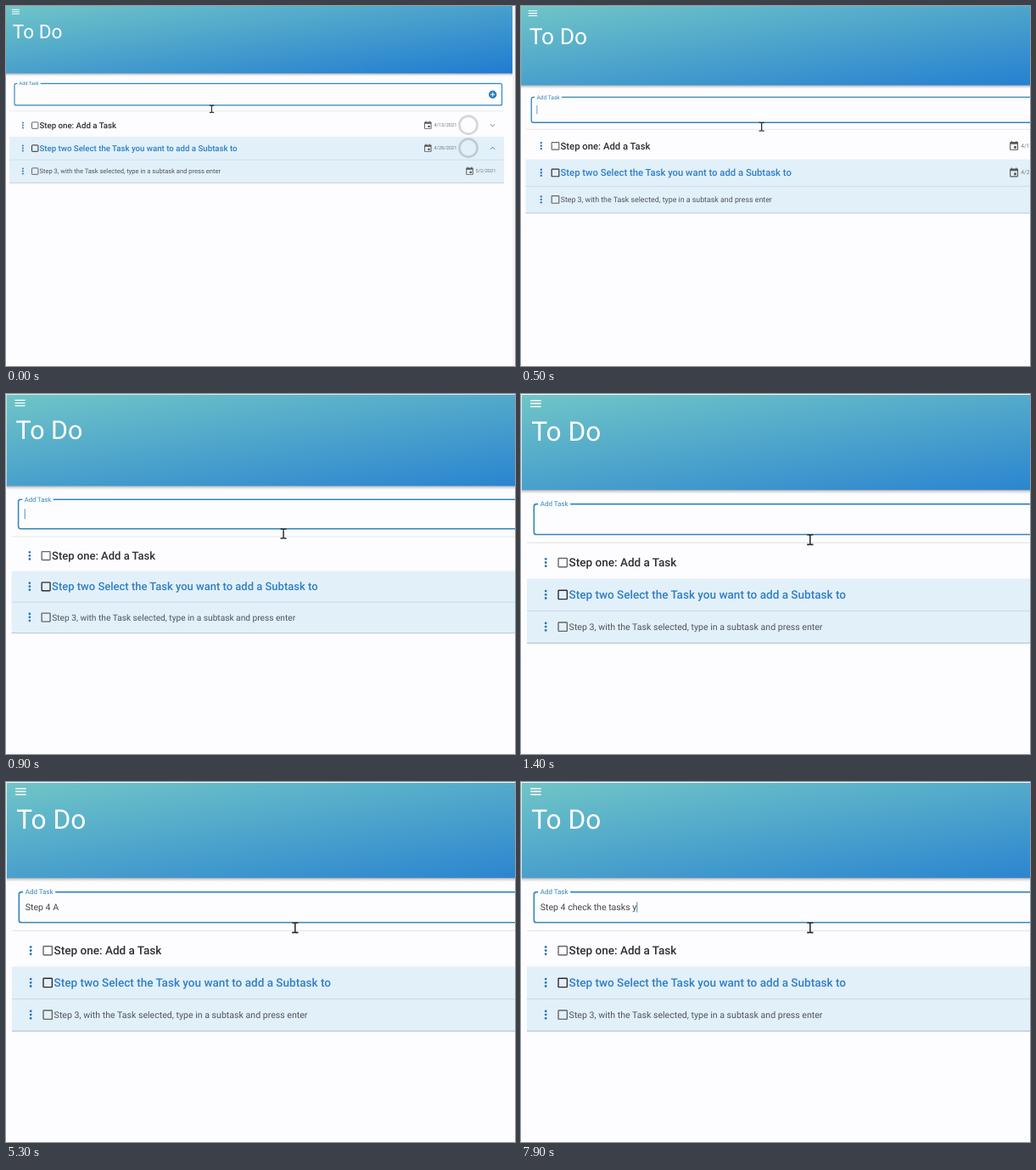
An HTML page for the animation above (8000 ms loop, 600x424 px).

```html
<!DOCTYPE html>
<html lang="en">
<head>
<meta charset="utf-8">
<title>To Do</title>
<style>
  html, body { margin: 0; width: 100%; height: 100%; overflow: hidden; background: #fdfcfe; }
  svg { display: block; width: 100vw; height: 100vh; }
  text { font-family: Roboto, sans-serif; text-rendering: geometricPrecision; white-space: pre; }
  .line { fill: none; stroke-width: 1; }
</style>
</head>
<body>
<svg viewBox="0 0 600 424" preserveAspectRatio="xMinYMin meet">
  <defs>
    <linearGradient id="sky" x1="0" y1="0" x2="1" y2="1">
      <stop offset="0" stop-color="#70c5c7"/>
      <stop offset="1" stop-color="#207bd1"/>
    </linearGradient>
    <linearGradient id="shade" x1="0" y1="0" x2="0" y2="1">
      <stop offset="0" stop-color="#000" stop-opacity=".36"/>
      <stop offset=".4" stop-color="#000" stop-opacity=".13"/>
      <stop offset="1" stop-color="#000" stop-opacity="0"/>
    </linearGradient>
    <path id="event" fill="#555" d="M17 12h-5v5h5v-5zM16 1v2H8V1H6v2H5c-1.1 0-2 .9-2 2v14c0 1.1.9 2 2 2h14c1.1 0 2-.9 2-2V5c0-1.1-.9-2-2-2h-1V1h-2zm3 18H5V8h14v11z"/>
  </defs>
  <g id="page">
    <rect x="597" width="3" height="424" fill="#f5f5f7"/>
    <rect x="-.4" y="79.3" width="597.4" height="3.6" fill="url(#shade)"/>
    <rect x="-.4" y="-.6" width="597.4" height="80" fill="url(#sky)"/>
    <path class="line" stroke="#fff" d="M7 4.3h8.9M7 6.8h8.9M7 9.2h8.9"/>
    <text x="7.8" y="38.2" font-size="22.6" fill="#fff">To Do</text>

    <path class="line" stroke="#3086bf" style="stroke-width:1.15"
      d="M13.4 91.3H12a2 2 0 0 0-2 2v21.6a2 2 0 0 0 2 2H582.6a2 2 0 0 0 2-2V93.3a2 2 0 0 0-2-2H40.6"/>
    <text x="15.3" y="93.2" font-size="5.68" fill="#3086bf">Add Task</text>
    <circle cx="573.7" cy="104.2" r="4.7" fill="#2a7fc0"/>
    <path class="line" stroke="#fff" d="M571.2 104.2h5M573.7 101.7v5"/>
    <text id="entry" x="15.3" y="106.6" font-size="7.56" fill="#454549"></text>
    <path id="caret" class="line" stroke="#4f86ad" style="stroke-width:.7" d="M0 99.6v8.8"/>

    <path class="line" stroke="#e6e6ea" style="stroke-width:.8" d="M4.1 123.8H587"/>
    <rect x="4.1" y="154.1" width="582.9" height="54.2" fill="#e2f0fa"/>
    <path class="line" stroke="#c8dae6" style="stroke-width:.7" d="M4.1 181.2H587"/>
    <path class="line" stroke="#b5c8d5" style="stroke-width:.8" d="M4.1 208.3H587"/>
    <g id="rows"></g>
    <path class="line" stroke="#2b2b30" style="stroke-width:1.1"
      d="M239.9 117.1h1.7l.9.5.9-.5h1.7M242.5 117.5v7.6M239.9 125.4h1.7l.9-.5.9.5h1.7"/>
  </g>
</svg>
<script>
const $ = id => document.getElementById(id);
const page = $('page'), entry = $('entry'), caret = $('caret');
const LOOP = 8000, STEP = 100, BLINK = 500, BLUE = '#2f7fc5';

const rows = [
  { y: 140.5, text: 'Step one: Add a Task', color: '#2e2e33', box: '#666', date: '4/13/2021', fold: 'down' },
  { y: 167.5, text: 'Step two Select the Task you want to add a Subtask to', color: BLUE, box: '#2c2c30', date: '4/28/2021', fold: 'up' },
  { y: 194.5, text: 'Step 3, with the Task selected, type in a subtask and press enter', color: '#505459', box: '#666', date: '5/2/2021' }
];

function rowMarkup({ y, text, color, box, date, fold }) {
  const dots = [-3, 0, 3].map(d => `<circle cx="19.9" cy="${y + d}" r="1" fill="#2b75b5"/>`).join('');
  const left = fold ? 491.7 : 540.9;
  const font = fold ? 'font-size="9.68" font-weight="500"' : 'font-size="7.57"';
  const dir = fold === 'up' ? -1 : 1;
  const extras = fold ? `
    <circle class="line" cx="545" cy="${y - .3}" r="10.5" stroke="#000" stroke-opacity=".15" style="stroke-width:2.8"/>
    <path class="line" stroke="${dir < 0 ? BLUE : '#777'}" d="M571.1 ${y - 1.2 * dir}l2.5 ${2.5 * dir} 2.5 ${-2.5 * dir}"/>` : '';
  return `${dots}
    <rect class="line" x="30.5" y="${y - 3.6}" width="7.4" height="7.4" rx=".5" stroke="${box}"/>
    <text x="${fold ? 39.4 : 39.5}" y="${y + (fold ? 3.4 : 2.8)}" ${font} fill="${color}">${text}</text>
    <use href="#event" transform="translate(${left} ${y - 5.5}) scale(.47)"/>
    <text x="${left + 12.7}" y="${y + 1.7}" font-size="5.68" fill="#77797d">${date}</text>${extras}`;
}
$('rows').innerHTML = rows.map(rowMarkup).join('');

// Key presses as [time, resulting text]
const keys = [[1900, 'S'], [2100, 'St'], [2200, 'Ste'], [2300, 'Step'], [2500, 'Step '],
  [2700, 'Step 4'], [3900, 'Step 4 '], [4700, 'Step 4 A'], [6600, 'Step 4 ']];
const phrase = 'check the tasks ';
for (let i = 0; i < phrase.length; i++) keys.push([6690 + i * 67, 'Step 4 ' + phrase.slice(0, i + 1)]);
keys.push([7900, 'Step 4 ' + phrase + 'y']);

const smooth = u => { u = Math.min(1, Math.max(0, u)); return u * u * (3 - 2 * u); };
const zoomAt = t => smooth((t + 65) / 1260);
const zoomStart = zoomAt(0);

function caretOn(t, lastKey) {
  if (lastKey) return Math.floor((t - lastKey) / BLINK) % 2 === 0;
  return t >= 200 && (t < 1100 || t >= 1600);
}

function draw(t) {
  const grow = .4 * (zoomAt(t) - zoomStart) / (1 - zoomStart);
  page.setAttribute('transform', `translate(${grow * 3.3} ${grow * 4.5}) scale(${1 + grow})`);

  const [lastKey, text] = keys.filter(k => k[0] <= t).pop() || [0, ''];
  if (entry.textContent !== text) entry.textContent = text;
  const width = text ? entry.getComputedTextLength() : 0;
  caret.setAttribute('transform', `translate(${15.7 + width} 0)`);
  caret.setAttribute('visibility', caretOn(t, lastKey) ? 'visible' : 'hidden');
}

const start = performance.now();
function tick() {
  const t = (performance.now() - start) % LOOP;
  draw(Math.floor(t / STEP) * STEP);
  requestAnimationFrame(tick);
}
tick();
</script>
</body>
</html>
```
